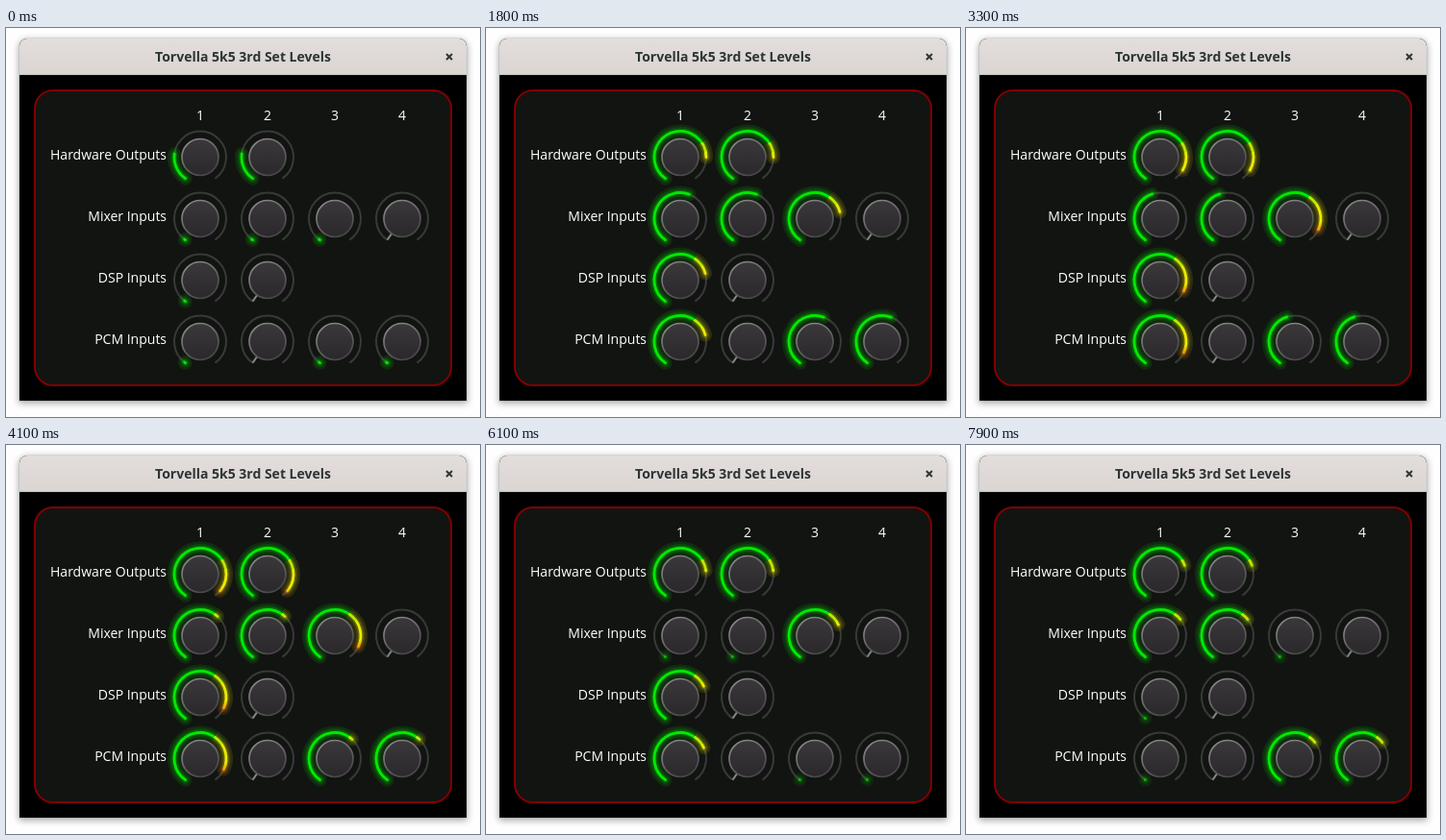
Animation, 493 px wide and 405 px high, one loop 8 s. Source, as an HTML page with a canvas:

```html
<!DOCTYPE html>
<html>
<head>
<meta charset="utf-8">
<style>
  html, body { margin: 0; width: 100%; height: 100%; overflow: hidden; background: #fdfefd; }
  svg, canvas { position: absolute; left: 0; top: 0; }
  .window {
    position: absolute; left: 14px; top: 11px; width: 465px; height: 377px;
    border-radius: 8px 8px 0 0; background: #000;
    box-shadow: 0 2px 7px 1px rgba(0, 0, 0, .32), 0 0 0 1px rgba(0, 0, 0, .05);
  }
  .bar {
    height: 38px; box-sizing: border-box; border-radius: 8px 8px 0 0;
    background: linear-gradient(#e3dddb, #dad6d2); border-bottom: 1px solid #c4beb8;
  }
  text { font: 14px "Open Sans", "Noto Sans", sans-serif; fill: #fff; }
  .title { font-weight: 700; fill: #2e3436; }
</style>
</head>
<body>
<div class="window"><div class="bar"></div></div>
<svg id="scene" width="493" height="405">
  <defs>
    <linearGradient id="face" x2="0" y2="1">
      <stop stop-color="#3b383c"/><stop offset="1" stop-color="#2b282c"/>
    </linearGradient>
    <linearGradient id="rim" x2=".6" y2="1">
      <stop stop-color="#929292"/><stop offset="1" stop-color="#474747"/>
    </linearGradient>
  </defs>
  <text class="title" x="246.5" y="35" text-anchor="middle">Torvella 5k5 3rd Set Levels</text>
  <path d="M458 27l6 6m0-6l-6 6" stroke="#2e3436" stroke-width="2"/>
  <rect x="30" y="65" width="433" height="307" rx="19" fill="#121411" stroke="#800000" stroke-width="2"/>
</svg>
<canvas id="meters" width="493" height="405"></canvas>
<script>
const START = 125, SWEEP = 290, RADIUS = 27, LOOP = 8000;
const scene = document.getElementById('scene');
const ctx = document.getElementById('meters').getContext('2d');
const rad = deg => deg * Math.PI / 180;
const colX = i => 202 + 70 * i;
const rowY = i => 134.5 + 64 * i;

// Each hit is [ms, peak in degrees]; the level then falls by `fall` degrees per ms.
const signals = {
  out: {
    fall: .1,
    hits: [[0, 62], [300, 88], [1500, 265], [2700, 262], [3300, 265], [3900, 295],
           [4600, 270], [5200, 268], [6000, 237], [6400, 262], [7900, 215]]
  },
  beat: {
    fall: .18,
    hits: [[0, 2], [1400, 237], [2700, 235], [3900, 223], [5100, 180], [6400, 235], [7900, 196]]
  },
  synth: {
    fall: .12,
    hits: [[0, 2], [1500, 256], [2700, 255], [3300, 260], [3900, 284], [5200, 264], [6000, 222]]
  }
};

const rows = [
  ['Hardware Outputs', ['out', 'out']],
  ['Mixer Inputs', ['beat', 'beat', 'synth', null]],
  ['DSP Inputs', ['synth', null]],
  ['PCM Inputs', ['synth', null, 'beat', 'beat']]
];

function add(tag, attrs, text = '') {
  const el = document.createElementNS('http://www.w3.org/2000/svg', tag);
  for (const key in attrs) el.setAttribute(key, attrs[key]);
  el.textContent = text;
  scene.append(el);
}

function polar(x, y, r, deg) {
  return `${x + r * Math.cos(rad(deg))} ${y + r * Math.sin(rad(deg))}`;
}

function drawKnob(x, y, live) {
  const from = polar(x, y, RADIUS, START), to = polar(x, y, RADIUS, START + SWEEP);
  add('path', { d: `M${from}A${RADIUS} ${RADIUS} 0 1 1 ${to}`, fill: 'none', stroke: '#383a38', 'stroke-width': 2 });
  if (!live) {
    add('path', { d: `M${from}L${polar(x, y, 19, START)}`, stroke: '#858585', 'stroke-width': 2 });
  }
  add('circle', { cx: x, cy: y, r: 19, fill: 'url(#face)', stroke: 'url(#rim)', 'stroke-width': 1.7 });
}

// Green up to `warm` degrees, then lime, yellow and a blend into orange.
function ringPaint(x, y, warm) {
  const lead = 30;
  const paint = ctx.createConicGradient(rad(START - lead), x, y);
  const stop = (deg, colour) => paint.addColorStop((deg + lead) / 360, colour);
  stop(0, '#00f000');
  stop(warm, '#00f000');
  stop(warm, '#bff000');
  stop(warm + 23, '#bff000');
  stop(warm + 23, '#f4f000');
  stop(warm + 65, '#f4f000');
  stop(warm + 85, '#ff9000');
  return paint;
}

const meters = [];
for (let i = 0; i < 4; i++) {
  add('text', { x: colX(i), y: 96, 'text-anchor': 'middle' }, i + 1);
}
rows.forEach(([label, inputs], row) => {
  const y = rowY(row);
  add('text', { x: 167, y: y + 2, 'text-anchor': 'end' }, label);
  inputs.forEach((name, col) => {
    const x = colX(col);
    drawKnob(x, y, name);
    if (name) meters.push({ x, y, signal: signals[name], paint: ringPaint(x, y, row ? 178 : 201) });
  });
});

function levelAt({ fall, hits }, t) {
  const levels = hits.map(([at, peak]) => t < at ? 0 : peak - fall * (t - at));
  return Math.max(0, ...levels);
}

function drawLevel({ x, y, signal, paint }, t) {
  const level = levelAt(signal, t);
  const strength = level < 1 ? .65 : 1;
  ctx.strokeStyle = paint;
  ctx.lineCap = 'round';
  ctx.beginPath();
  ctx.arc(x, y, RADIUS, rad(START), rad(START + Math.max(level, .5)));
  for (const [width, alpha] of [[14, .12], [9, .12], [5.5, .2], [2.8, .95]]) {
    ctx.lineWidth = width;
    ctx.globalAlpha = alpha * strength;
    ctx.stroke();
  }
}

function frame(now) {
  const t = Math.floor(now % LOOP / 100) * 100;
  ctx.clearRect(0, 0, 493, 405);
  meters.forEach(meter => drawLevel(meter, t));
  requestAnimationFrame(frame);
}
requestAnimationFrame(frame);
</script>
</body>
</html>
```
